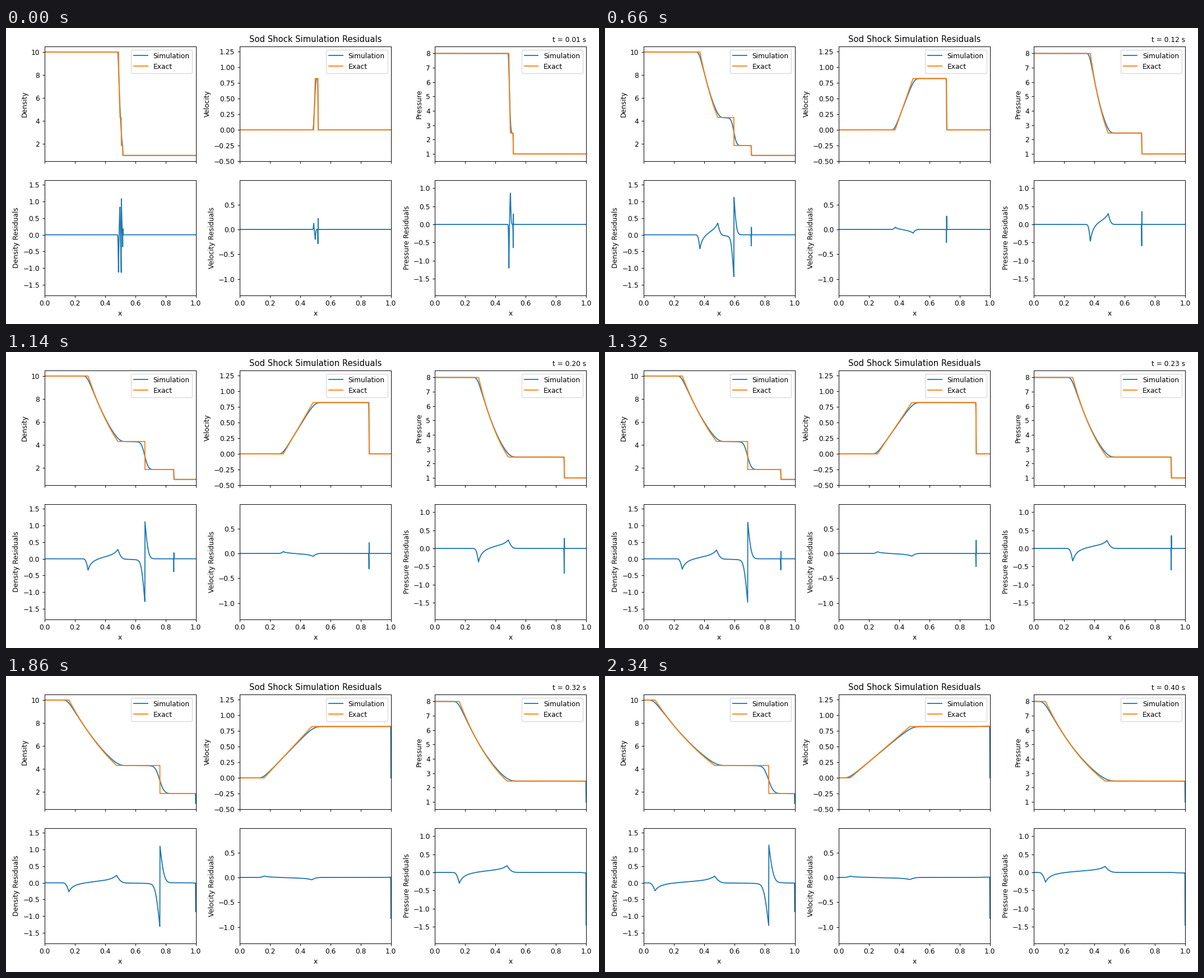
A matplotlib script that plays this animation: 1058 px wide and 529 px high, repeating every 2.4 s.

```python
import numpy as np
import matplotlib.pyplot as plt
from matplotlib.animation import FuncAnimation

plt.rcParams["font.family"] = "DejaVu Sans"

W, H, DPI = 1058, 529, 529 / 6
FRAMES, STEP = 40, 0.01
G = 1.4
LEFT, RIGHT = (10.0, 0.0, 8.0), (1.0, 0.0, 1.0)  # density, velocity, pressure
X = np.linspace(0, 1, 1000)
DX = X[1] - X[0]
CFL = 0.9


def star_state():
    """Pressure and velocity between the rarefaction and the shock."""
    c = np.sqrt(G * LEFT[2] / LEFT[0])
    lo, hi = RIGHT[2], LEFT[2]
    for _ in range(60):
        p = (lo + hi) / 2
        u_fan = 2 * c / (G - 1) * (1 - (p / LEFT[2]) ** ((G - 1) / (2 * G)))
        u_shock = (p - 1) * np.sqrt(2 / ((G + 1) * p + G - 1))
        lo, hi = (p, hi) if u_fan > u_shock else (lo, p)
    return p, u_shock


def exact(t):
    c = np.sqrt(G * LEFT[2] / LEFT[0])
    p, u = star_state()
    rho_l = LEFT[0] * (p / LEFT[2]) ** (1 / G)
    k = (G - 1) / (G + 1)
    rho_r = (p + k) / (k * p + 1)
    shock = rho_r * u / (rho_r - 1)
    xi = (X - 0.5) / t
    u_fan = 2 / (G + 1) * (c + xi)
    ratio = np.clip(1 - (G - 1) / 2 * u_fan / c, 0.01, None)
    zones = [xi < -c, xi < u - np.sqrt(G * p / rho_l), xi < u, xi < shock]
    fan = (LEFT[0] * ratio ** (2 / (G - 1)), u_fan,
           LEFT[2] * ratio ** (2 * G / (G - 1)))
    near, far = (rho_l, u, p), (rho_r, u, p)
    return [np.select(zones, [LEFT[i], fan[i], near[i], far[i]], RIGHT[i])
            for i in range(3)]


def primitive(q):
    rho, u = q[0], q[1] / q[0]
    return rho, u, (G - 1) * (q[2] - 0.5 * rho * u * u)


def simulate():
    """First-order finite volumes with the Rusanov flux and fixed ends."""
    rho, u, p = (np.where(X < 0.5, a, b) for a, b in zip(LEFT, RIGHT))
    q = np.array([rho, rho * u, p / (G - 1) + 0.5 * rho * u * u])
    t, states = 0.0, []
    for n in range(1, FRAMES + 1):
        end = n * STEP
        while t < end - 1e-12:
            rho, u, p = primitive(q)
            speed = np.abs(u) + np.sqrt(G * p / rho)
            dt = min(CFL * DX / speed.max(), end - t)
            f = np.array([q[1], q[1] * u + p, (q[2] + p) * u])
            a = np.maximum(speed[1:], speed[:-1])
            flux = 0.5 * (f[:, 1:] + f[:, :-1] - a * (q[:, 1:] - q[:, :-1]))
            q[:, 1:-1] -= dt / DX * (flux[:, 1:] - flux[:, :-1])
            t += dt
        states.append(primitive(q.copy()))
    return states


states = simulate()

fig = plt.figure(figsize=(W / DPI, H / DPI), dpi=DPI, facecolor="white")


def panel(col, top, label, ylim):
    ax = fig.add_axes([(68.6 + 348.3 * col) / W, 1 - (top + 205.4) / H,
                       269.9 / W, 205.4 / H])
    ax.set(xlim=(0, 1), ylim=ylim, ylabel=label)
    return ax


PANELS = [("Density", (0.5, 10.5), (-1.809, 1.633)),
          ("Velocity", (-0.5, 1.338), (-1.321, 0.988)),
          ("Pressure", (0.5, 8.5), (-1.957, 1.221))]

sim_lines, exact_lines, res_lines = [], [], []
for col, (name, ylim, res_lim) in enumerate(PANELS):
    ax = panel(col, 32.6, name, ylim)
    ax.tick_params(labelbottom=False)
    sim_lines += ax.plot(X, 0 * X, label="Simulation")
    exact_lines += ax.plot(X, 0 * X, label="Exact")
    ax.legend(loc="upper right")
    if col == 1:
        ax.set_title("Sod Shock Simulation Residuals")
    if col == 2:
        clock = ax.set_title("", loc="right", fontsize=10)
    ax = panel(col, 272.1, name + " Residuals", res_lim)
    ax.set_xlabel("x")
    res_lines += ax.plot(X, 0 * X)


def draw(n):
    t = (n + 1) * STEP
    truth = exact(t)
    for i in range(3):
        sim_lines[i].set_ydata(states[n][i])
        exact_lines[i].set_ydata(truth[i])
        res_lines[i].set_ydata(states[n][i] - truth[i])
    clock.set_text(f"t = {t:.2f} s")
    return [*sim_lines, *exact_lines, *res_lines, clock]


anim = FuncAnimation(fig, draw, frames=FRAMES, interval=60, repeat=True)
plt.show()
```
